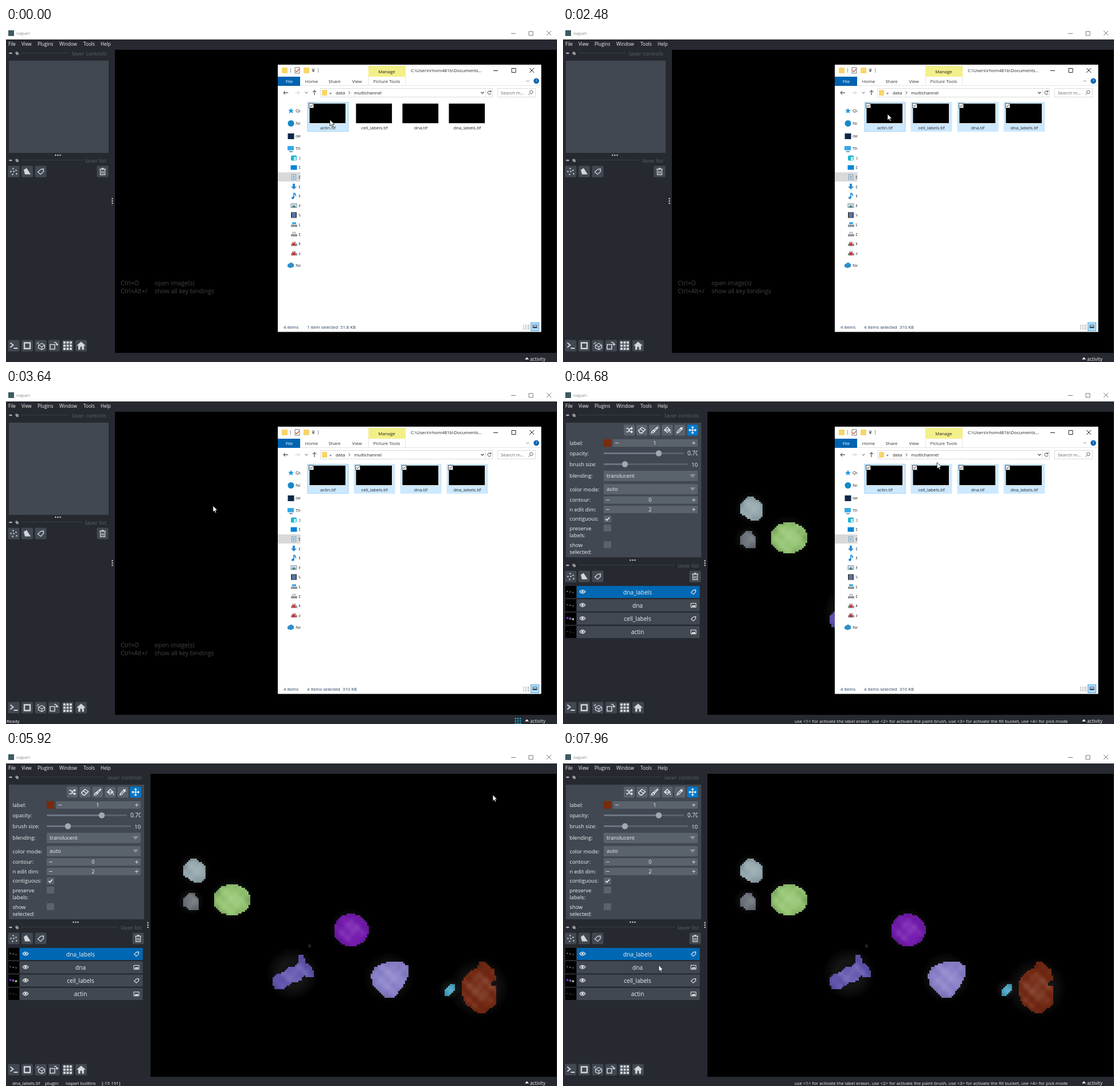
An HTML page with a canvas for the animation above (8 s loop, 961x583 px).

```html
<!DOCTYPE html>
<html lang="en">
<head>
<meta charset="utf-8">
<title>Opening images by drag and drop</title>
<style>
html, body { margin: 0; width: 100%; height: 100%; overflow: hidden; background: #262930; }
canvas { display: block; }
</style>
</head>
<body>
<canvas id="stage" width="961" height="583"></canvas>
<script>
const g = document.getElementById('stage').getContext('2d');
const BG = '#262930', PANEL = '#414851', FIELD = '#5a626c', INK = '#f0f1f2', ICON = '#d3d5d8', BLUE = '#0078cc';
const LOOP = 8000, CLICK_ALL = 1400, DRAG = 2560, READY = 3560, LOADED = 3880, MINIMISED = 5680;

// time, x, y of the pointer tip; eased between neighbours
const pointerKeys = [
  [560, 565, 160], [1120, 795, 168], [1520, 795, 168], [2240, 566, 150], [2560, 566, 150],
  [3400, 361, 202], [3960, 361, 202], [5240, 851, 75], [5760, 851, 75], [6200, 844.5, 74],
  [6520, 844.5, 74], [7480, 167, 372]
];

function pointerAt(t) {
  const i = pointerKeys.findIndex(k => k[0] > t);
  if (i < 1) return pointerKeys.at(i).slice(1);
  const [t0, x0, y0] = pointerKeys[i - 1], [t1, x1, y1] = pointerKeys[i];
  const u = (t - t0) / (t1 - t0), e = u * u * (3 - 2 * u);
  return [x0 + (x1 - x0) * e, y0 + (y1 - y0) * e];
}

function rect(x, y, w, h, color, r = 0) {
  g.fillStyle = color;
  g.beginPath();
  g.roundRect(x, y, w, h, r);
  g.fill();
}
function frame(x, y, w, h, color) {
  g.strokeStyle = color;
  g.lineWidth = 1;
  g.strokeRect(x + .5, y + .5, w - 1, h - 1);
}
function dot(x, y, r, color) {
  g.fillStyle = color;
  g.beginPath();
  g.arc(x, y, r, 0, 7);
  g.fill();
}
// y is the visual middle of the line
function text(s, x, y, size, color = INK, align = 'left') {
  g.font = `${size}px "Open Sans", "Noto Sans", sans-serif`;
  g.textAlign = align;
  g.fillStyle = color;
  g.fillText(s, x, y + size * .35);
}
function shape(d, x, y, { fill, stroke, width = 1 }) {
  g.save();
  g.translate(x, y);
  const path = new Path2D(d);
  if (fill) { g.fillStyle = fill; g.fill(path); }
  if (stroke) { g.strokeStyle = stroke; g.lineWidth = width; g.stroke(path); }
  g.restore();
}
const line = (d, x, y, stroke, width) => shape(d, x, y, { stroke, width });
const solid = (d, x, y, fill) => shape(d, x, y, { fill });
const CHECK = 'M-3 0L-1 2.5L3.5 -2.5', DOWN = 'M-2.5 -1.2L0 1.2L2.5 -1.2';
const TAG = 'M-5 1L0 -4L5 -4.5L5 0L0 5Z M2.6 -2h.6';

// Fills each outline with square pixels, brighter in the middle, over a faint halo
function paintCells() {
  const layer = document.createElement('canvas');
  layer.width = 961;
  layer.height = 583;
  const c = layer.getContext('2d'), size = 3;
  const oval = (x, y, a, b) => `M${x - a} ${y}a${a} ${b} 0 1 0 ${2 * a} 0a${a} ${b} 0 1 0 ${-2 * a} 0`;
  const cells = {
    '#95a8ad': 'M322 186H331L336 191L347 197V222L342 227H328L309 215V199Z',
    '#6c7179': 'M319 245H327L335 255V277H323L310 269V256Z',
    '#94c573': oval(394, 258, 32.5, 27),
    '#761db0': oval(602, 311, 30.5, 28.5),
    '#6156ae': 'M509 354H519L523 368L532 374L536 383V394H528L519 389L514 400L500 402L484 414H470L464 402L467 391L484 383L493 376L507 373L511 364Z',
    '#8880c8': 'M671 366H690L703 374V388L692 410L676 430H664L640 406L636 391L643 376L656 369Z',
    '#48a4c4': 'M774 406H783V416L774 425H765V416Z',
    '#722913': 'M826 367H835L853 381L854 399L845 402V406L855 410L854 440L837 455H822L803 441L795 424V400L806 385L820 378Z'
  };
  for (const color in cells) {
    const path = new Path2D(cells[color]), pixels = [];
    for (let y = 183; y < 460; y += size) for (let x = 306; x < 860; x += size)
      if (c.isPointInPath(path, x + size / 2, y + size / 2)) pixels.push([x, y]);
    const mean = k => pixels.reduce((sum, p) => sum + p[k], 0) / pixels.length;
    const cx = mean(0), cy = mean(1);
    const radius = Math.max(...pixels.map(([x, y]) => Math.hypot(x - cx, y - cy))), reach = radius + 7;
    const halo = c.createRadialGradient(cx, cy, radius * .6, cx, cy, reach);
    halo.addColorStop(0, 'rgba(90,90,90,.22)');
    halo.addColorStop(1, 'rgba(90,90,90,0)');
    c.fillStyle = halo;
    c.fillRect(cx - reach, cy - reach, 2 * reach, 2 * reach);
    for (const [x, y] of pixels) {
      const far = Math.hypot(x - cx, y - cy) / radius;
      const light = .09 - .22 * far * far + .04 * (Math.sin(x * .31) * Math.cos(y * .27) + Math.sin(x * .17 - y * .21));
      c.fillStyle = color;
      c.fillRect(x, y, size, size);
      c.fillStyle = light > 0 ? `rgba(255,255,255,${light})` : `rgba(0,0,0,${-light})`;
      c.fillRect(x, y, size, size);
    }
  }
  c.fillStyle = '#222';
  c.fillRect(527, 336, 5, 5);
  return layer;
}
const cellLayer = paintCells();

function header(title, y, right) {
  text(title, right, y + 1, 9.5, '#59616b', 'right');
  const start = right - g.measureText(title).width;
  rect(start - 1, y + 5, right - start + 2, 4, BG);
  g.setLineDash([1, 1]);
  line(`M27 0H${start - 6}`, 0, y - .5, '#4b535d');
  g.setLineDash([]);
  line('M-2.5 0Q0 -2 2.5 0Q0 2 -2.5 0', 8, y, ICON);
  line('M-2 -2h3v3h-3ZM-.5 -.5h3v3h-3Z', 19, y, ICON, .8);
}
function button(x, y, color = PANEL, size = 20) {
  rect(x - size / 2, y - size / 2, size, size, color, 2);
}
function bullets(x, y, dx, dy) {
  for (const i of [-1, 0, 1]) dot(x + i * dx, y + i * dy, 1.2, ICON);
}

function mainWindow(edge, loaded) {
  rect(0, 0, 961, 583, BG);
  rect(0, 0, 961, 20, '#fff');
  rect(4, 4, 10, 10, '#3f5a62');
  text('napari', 18, 9.5, 7.8, '#888');
  line('M-4 0h8', 885, 9.5, '#777');
  line('M-3.5 -3.5h7v7h-7Z', 915.5, 9.5, '#777');
  line('M-4 -4L4 4M4 -4L-4 4', 947, 9, '#777');
  ['File', 'View', 'Plugins', 'Window', 'Tools', 'Help'].forEach((s, i) =>
    text(s, [4, 27, 55, 93, 135, 165][i], 28, 8.2));
  rect(edge, 38, 960 - edge, 529, '#000');

  const listY = loaded ? 306 : 231, toolsY = listY + 19.5;
  header('layer controls', 44, edge - 15);
  rect(5, 57, edge - 16, loaded ? 235 : 161, PANEL, 1);
  bullets(edge / 2 - 4.5, listY - 9, 4, 0);
  bullets(edge - 4.5, 302, 0, 4);
  header('layer list', listY, edge - 15);

  for (const x of [13.5, 37, 60.5, edge - 21.5]) button(x, toolsY);
  for (const [x, y] of [[-5, 0], [-1, -5], [0, 0], [4, -2], [-2, 5], [5, 4]]) dot(13.5 + x, toolsY + y, 1.2, ICON);
  solid('M-6 -3L-1 -6L6 5L-4 5Z', 37, toolsY, ICON);
  line(TAG, 60.5, toolsY, ICON, 1.3);
  line('M-5.5 -4H5.5M-2 -5.5H2M-4 -3V5.5H4V-3M-1.3 -1V3.5M1.3 -1V3.5', edge - 21.5, toolsY, ICON, 1.3);

  const by = 554.5;
  for (let i = 0; i < 6; i++) button(13.5 + i * 23.5, by);
  line('M-6 -5L-1 -1L-6 3M0 4.5H7', 13.5, by, ICON, 2);
  line('M-5 -5H5V5H-5Z', 37, by, ICON, 2.4);
  line('M-7 -3L-3 -6M-4 -1L2 -4L7 -1L7 4L2 7L-4 4ZM-4 -1L2 2L7 -1M2 2V7', 60.5, by, ICON, 1.3);
  line('M-6 -2H2V6H-6ZM1 -6Q6 -6 6 -1M4 -3L6 -1L8 -3', 83, by, ICON, 1.6);
  for (let i = 0; i < 9; i++) rect(100 + i % 3 * 5.5, 547 + (i / 3 | 0) * 5.5, 4, 4, ICON);
  solid('M0 -7L8 0H5V7H1.5V2H-1.5V7H-5V0H-8Z', 131, by, ICON);
  solid('M-3.5 2L0 -2L3.5 2Z', 908.5, 576.5, INK);
  text('activity', 914, 578, 8.3);
}

function spin(y, value, left = 71) {
  rect(left, y - 6.5, 235 - left, 13, FIELD, 1);
  line('M-3 0H3', left + 7, y, ICON);
  line('M-3 0H3M0 -3V3', 228, y, ICON);
  text(value, (left + 235) / 2 - 1, y, 9.3, INK, 'center');
}
function slider(y, end, knob) {
  rect(71, y - 2, end - 71, 3, FIELD, 1);
  rect(71, y - 2, knob - 71, 3, '#6c7683', 1);
  dot(knob, y - .5, 5.2, '#a3a8b0');
}
function combo(y, value) {
  rect(71, y - 9, 164, 18, FIELD, 1);
  text(value, 76, y, 9.3);
  solid('M-5 -3H5L0 3Z', 226, y, '#8b929b');
}

function layerControls() {
  const tools = [
    'M-5 -3H-2L2 3H5M-5 3H-2L2 -3H5M3.5 -5L5.5 -3L3.5 -1M3.5 1L5.5 3L3.5 5',
    'M-6 1L0 -5L6 -1L0 5H-3ZM-3 -2L3 2', 'M5 -5.5L6 -4.5L0 2L-2 0ZM-2 1Q-5 1 -5.5 5Q-1 5 0 3Z',
    'M-5 0L0 -5L5 0L0 4ZM-5 0H5M5.5 2V5', 'M-5 5L-4 2L1 -3L3 -1L-2 4ZM1 -5L5 -1M3 -3L5 -5',
    'M-6 0H6M0 -6V6M-4 -2L-6 0L-4 2M4 -2L6 0L4 2M-2 -4L0 -6L2 -4M-2 4L0 6L2 4'
  ];
  tools.forEach((d, i) => {
    const x = 115.5 + i * 22.1;
    button(x, 70, i === 5 ? BLUE : FIELD, 19);
    line(d, x, 70, INK, 1.3);
  });
  const labels = {
    'label:': 92.5, 'opacity:': 111, 'brush size:': 130, 'blending:': 150, 'color mode:': 173.5,
    'contour:': 192, 'n edit dim:': 208.5, 'contiguous:': 225, 'preserve': 241.5, 'labels:': 254,
    'show': 270.5, 'selected:': 283
  };
  for (const s in labels) text(s, 11.5, labels[s], 9.3);
  rect(71, 86, 13, 13, '#7b2a10');
  spin(92.5, '1', 87);
  slider(111, 211, 167);
  text('0.70', 217, 111, 9.9);
  rect(235, 104, 5, 14, PANEL);
  slider(130, 218, 108);
  text('10', 224, 130.5, 9.7);
  combo(150, 'translucent');
  combo(173, 'auto');
  spin(192, '0');
  spin(208.5, '2');
  for (const y of [225, 241, 270]) rect(71, y - 6, 13, 12, FIELD, 1);
  line(CHECK, 77.5, 225, INK, 1.6);
}

function layerList() {
  const palettes = [['#9cb', '#9c7', '#a8a'], ['#aaa', '#ddd', '#bbb'], ['#63b', '#85c', '#8c7'], ['#555', '#666', '#444']];
  ['dna_labels', 'dna', 'cell_labels', 'actin'].forEach((name, i) => {
    const y = 352.5 + i * 23.3;
    rect(4, y - 10.5, 19, 21, '#000');
    palettes[i].forEach((color, k) => dot(7.5 + k * 5, y - 1 + k, i === 2 ? 2 : .9, color));
    rect(24, y - 10.5, 214.5, 21, i ? PANEL : '#0068b3', 1);
    line('M-5 0Q0 -6 5 0Q0 6 -5 0', 34, y - .5, INK, 1.2);
    dot(34, y - .5, 1.8, INK);
    text(name, 130, y + .5, 10.1, INK, 'center');
    if (i % 2) {
      line('M-4.5 -3.5H4.5V3.5H-4.5Z', 227.5, y, INK);
      solid('M-3.5 2.5L-1 -.5L.5 1L2 -1L3.5 2.5Z', 227.5, y, INK);
    } else {
      g.save();
      g.translate(227.5, y);
      g.scale(.8, .8);
      line(TAG, 0, 0, INK, 1.3);
      g.restore();
    }
  });
}

function sidebar() {
  g.save();
  g.beginPath();
  g.rect(474, 121, 39.5, 390);
  g.clip();
  rect(474, 252, 40, 16, '#d9d9d9');
  const star = 'M0 -5L1.4 -1.5L5 -1.5L2.2 .8L3.3 4.6L0 2.4L-3.3 4.6L-2.2 .8L-5 -1.5L-1.4 -1.5Z';
  solid(star, 497, 144.5, '#2196e0');
  dot(497, 166.5, 5.5, '#1687c9');
  rect(491.5, 184, 11, 10, '#0e2748');
  rect(491, 206, 11, 7.5, '#37a8e6');
  rect(494, 215, 6, 1.5, '#5a7f99');
  ['Qu', 'No', 'ow', 'Th'].forEach((s, i) => text(s, 505, 144.5 + i * 22, 7.9, '#222'));
  ['3D', 'De', 'Do', 'Do', 'Mu', 'Pi', 'Vi', 'Lo', 'Da', 'k', 'z'].forEach((s, i) => {
    const y = 227 + i * 16.6;
    text(s, 510.5, y, 7.9, '#222');
    if (i === 0) { rect(497, y - 4.5, 10, 9, '#22b4d0', 2); rect(502, y - 2, 4, 6, '#b8ecf4'); }
    if (i === 1) rect(496.5, y - 4, 11, 8, '#0a84d8');
    if (i === 2) { rect(498, y - 5, 8, 10, '#e9f1f6'); frame(498, y - 5, 8, 10, '#7a96a8'); line('M-2 -2H2M-2 0H2M-2 2H2', 502, y, '#3f90c4'); }
    if (i === 3) solid('M-2 -5H2V0H5L0 5L-5 0H-2Z', 502, y, '#2a8ad4');
    if (i === 4) { line('M0 3V-5Q4 -4 3 0', 502, y, '#1687d9', 1.6); dot(500.3, y + 3, 2.2, '#1687d9'); }
    if (i === 5) { rect(496.5, y - 4, 11, 8, '#c8dce6'); solid('M-4 3L0 -1L4 3Z', 502, y, '#4d7f72'); frame(496.5, y - 4, 11, 8, '#8fa3ad'); }
    if (i === 6) { rect(497, y - 5, 10, 10, '#444'); rect(499, y - 4, 6, 8, '#5577b0'); }
    if (i > 6) {
      rect(497, y, 11, 4, '#8d949a');
      rect(499, y - 4, 7, 3, i === 7 ? '#2a9fe0' : '#c5cacf');
      if (i > 8) line('M-2.5 -2.5L2.5 2.5M2.5 -2.5L-2.5 2.5', 502, y + 1, '#d62222', 2);
    }
  });
  solid('M-6 -1L0 -5L5 -2V3L-1 5L-6 3Z', 497, 414, '#2f8fca');
  text('Ne', 505, 414, 7.9, '#222');
  g.restore();
}

function explorer(t, px, py) {
  const dark = '#222', folder = '#f8d568', all = t >= CLICK_ALL;
  rect(474, 64, 459.5, 466.5, '#fff');
  rect(481, 69, 10, 10, folder, 1);
  line('M0 -4V4', 496.5, 74, '#999');
  line('M-4 -5H4V5H-4Z', 508, 74, '#777');
  line(CHECK, 508, 74, '#c0562c', 1.2);
  rect(519, 69, 10, 10, folder, 1);
  line('M-2.5 -2H2.5', 536, 74, dark);
  solid('M-2.5 0H2.5L0 2.5Z', 536, 74, dark);
  line('M0 -4V4', 544.5, 74, '#999');
  rect(632, 66, 65, 19, '#f3f08a');
  text('Manage', 664, 76, 7.9, dark, 'center');
  text('C:\\Users\\rhom481b\\Documents...', 706, 74, 7.9, dark);
  if (py < 85 && px > 838 && px < 869 && t > LOADED) rect(838, 64, 31, 21, '#e2e2e2');
  line('M-4 0H4', 854, 74.5, dark);
  line('M-3.5 -3.5H3.5V3.5H-3.5Z', 885.5, 74, dark);
  line('M-4 -4L4 4M4 -4L-4 4', 917, 74, dark);

  rect(474, 85, 39, 16, '#0063b1');
  text('File', 494, 93, 7.9, '#fff', 'center');
  ['Home', 'Share', 'View', 'Picture Tools'].forEach((s, i) => text(s, [533, 573, 612, 664][i], 93, 7.9, '#333', 'center'));
  line('M632.5 85V100M696.5 85V100M513 100.5H933', 0, 0, '#e3e3e3');
  line(DOWN, 910, 92.5, '#888');
  dot(925, 92.5, 4.8, '#0a62b0');
  text('?', 925, 92.5, 7, '#fff', 'center');

  line('M4 0H-4M-1 -3L-4 0L-1 3', 488, 113, dark);
  line('M-4 0H4M1 -3L4 0L1 3', 508, 113, '#ccc');
  line(DOWN, 524, 113, '#555');
  line('M0 4V-4M-3 -1L0 -4L3 -1', 538, 113, dark);
  frame(548, 105, 301, 16, '#dcdcdc');
  line('M0 0V14', 836.5, 106, '#e3e3e3');
  rect(551, 108, 9, 10, folder, 1);
  text('«', 564, 113, 8, dark);
  text('data', 575, 113, 7.9, dark);
  line('M-1.2 -2.5L1.2 0L-1.2 2.5', 599, 113, '#555');
  text('multichannel', 607, 113, 7.9, dark);
  line(DOWN, 831, 113, '#444', 1.2);
  line('M2.5 -2A3 3 0 1 0 3 1M3 -4V-1.5H.5', 843, 113, '#444');
  frame(857, 105, 67, 16, '#dcdcdc');
  text('Search m...', 863, 113, 7.9, '#666');
  line('M-3.5 3.5L-.5 .5M-.5 .5A2.5 2.5 0 1 1 3 -3A2.5 2.5 0 1 1 -.5 .5', 915, 113, '#555');
  sidebar();

  ['actin.tif', 'cell_labels.tif', 'dna.tif', 'dna_labels.tif'].forEach((name, i) => {
    const x = 561.5 + i * 81, selected = all || i === 0;
    const hover = t < DRAG && Math.abs(px - x) < 36 && py > 129 && py < 182;
    if (selected || hover) rect(x - 36, 129, 72, 52, selected ? '#cce8ff' : '#e5f3ff');
    if (selected && (hover || i === 0)) frame(x - 36, 129, 72, 52, '#a5d5fb');
    rect(x - 32.5, 131.5, 64, 36, '#dfe3da');
    rect(x - 32, 132, 62.5, 34, '#000');
    if (selected || hover) {
      rect(x - 33.5, 131, 9, 9, '#fff');
      frame(x - 33.5, 131, 9, 9, '#555');
      if (selected) line('M-2.5 0L-.8 2L2.8 -2', x - 29, 135.3, '#222');
    }
    text(name, x, 174, 7.8, dark, 'center');
  });

  text('4 items', 484, 522, 7.7, '#1f3a5c');
  text(all ? '4 items selected' : '1 item selected', 525, 522, 7.7, '#1f3a5c');
  text(all ? '310 KB' : '51.8 KB', all ? 587 : 583, 522, 7.7, '#1f3a5c');
  for (let i = 0; i < 3; i++) line('M0 0H2M3.5 0H6M7.5 0H11', 902, 519 + i * 3, '#888');
  rect(915, 514, 15, 15, '#b5defa');
  frame(915, 514, 15, 15, '#4aa5e0');
  rect(918.5, 518, 8, 6, '#456');
  rect(919.5, 519, 6, 2, '#cde');
}

function statusBar(t, px, py) {
  const y = 578, size = 7.87;
  if (t < READY) return;
  if (t < LOADED) {
    text('Ready', 1, y, size);
    for (let i = 0; i < 9; i++) dot(888.5 + i % 3 * 4.3, 573.5 + (i / 3 | 0) * 4.3, 1.5, '#1b9ac0');
    return;
  }
  const overExplorer = t < MINIMISED && px > 474;
  if (px > 252 && py > 38 && !overExplorer) {
    const row = Math.round((py - 119) / 3), column = Math.round((px - 277) / 3);
    text('dna_labels.tif', 11, y, size);
    text('plugin:', 68, y, size);
    text('napari builtins', 104, y, size);
    text(`[${row} ${column}]`, 167, y, size);
  } else {
    text('use <1> for activate the label eraser, use <2> for activate the paint brush, ' +
      'use <3> for activate the fill bucket, use <4> for pick mode', 404, y, size);
  }
}

function draw(t) {
  const [px, py] = pointerAt(t), loaded = t >= LOADED;
  mainWindow(loaded ? 252 : 190, loaded);
  if (loaded) {
    g.drawImage(cellLayer, 0, 0);
    layerControls();
    layerList();
  } else {
    text('Ctrl+O', 200, 445, 10.6, '#414349');
    text('open image(s)', 259, 445, 10.6, '#414349');
    text('Ctrl+Alt+/', 200, 459.5, 10.6, '#414349');
    text('show all key bindings', 259, 459.5, 10.6, '#414349');
  }
  if (t < MINIMISED) explorer(t, px, py);
  statusBar(t, px, py);
  shape('M0 0V11L2.5 8.7L4.2 12.5L6 11.7L4.3 8H7.7Z', px, py, { fill: '#fff', stroke: '#111', width: .8 });
}

function tick() {
  draw(performance.now() % LOOP);
  requestAnimationFrame(tick);
}
tick();
</script>
</body>
</html>
```
